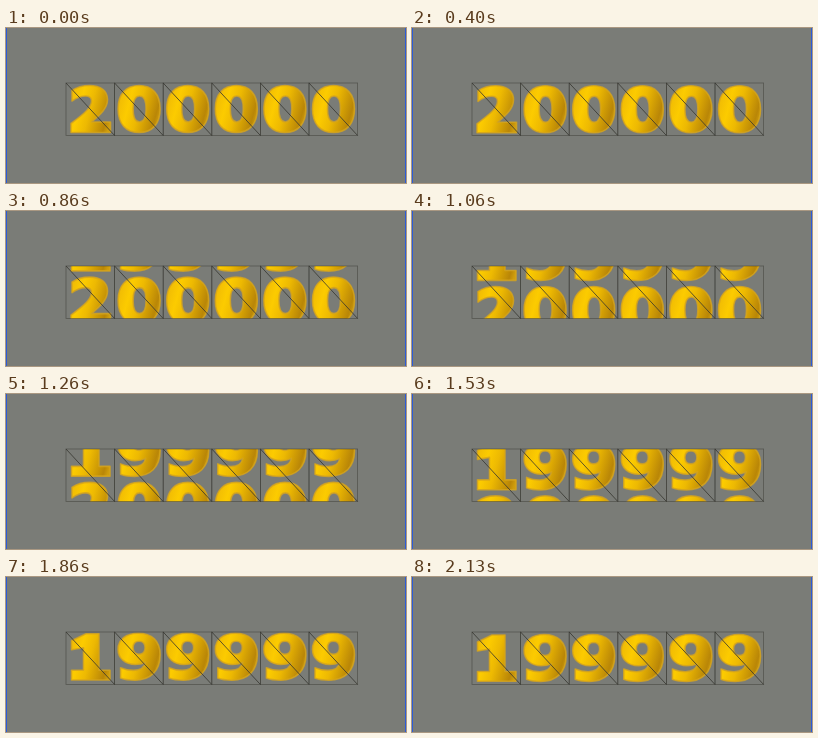
An HTML page for the animation above (2720 ms loop, 400 by 155 pixels).

```html
<!DOCTYPE html>
<html lang="en">
<head>
<meta charset="utf-8">
<title>Rolling counter</title>
<style>
  html, body { margin: 0; width: 100%; height: 100%; overflow: hidden; background: #7a7c77; }
  svg { display: block; width: 400px; height: 155px; }
  .digit { fill: url(#gold); fill-rule: evenodd; stroke: #d8a51c; stroke-opacity: .8; stroke-width: 1.6; stroke-linejoin: round; }
  .cell { fill: none; stroke: #30302b; stroke-opacity: .5; stroke-width: .8; }
  .slash { fill: none; stroke: #35352f; stroke-width: .8; }
</style>
</head>
<body>
<svg viewBox="0 0 400 155" role="img" aria-label="Counter rolling from 200000 to 199999">
  <defs>
    <linearGradient id="gold" gradientUnits="userSpaceOnUse" x1="3" y1="20" x2="46" y2="32">
      <stop offset="0" stop-color="#f0bb04"/>
      <stop offset=".25" stop-color="#fccb00"/>
      <stop offset=".5" stop-color="#edb902"/>
      <stop offset=".9" stop-color="#b98607"/>
      <stop offset="1" stop-color="#cf9d0c"/>
    </linearGradient>
    <clipPath id="window"><rect x="60" y="55" width="291.5" height="52.5"/></clipPath>
    <path id="d0" class="digit" d="M24.500 2.500C37.500 2.500 45.500 11 45.500 26S37.500 49.500 24.500 49.500S3.500 41 3.500 26S11.500 2.500 24.500 2.500ZM25 13C20.800 13 18.500 17 18.500 26S20.800 39 25 39S31.500 35 31.500 26S29.200 13 25 13Z"/>
    <path id="d1" class="digit" d="M20 3H33V39.500H44V49.300H5.500V39.500H17.500V17L5.500 19V10Z"/>
    <path id="d2" class="digit" d="M6 7.500C11 4 17 2.500 23.500 2.500C35 2.500 41.500 8 41.500 16.500C41.500 25 35 31 25.500 39H44.500V49.500H5V40.500C19 30 25.500 24.500 25.500 18C25.500 14.500 23 13 19.500 13C15 13 10.500 14.800 6 18Z"/>
    <path id="d9" class="digit" d="M23.500 2.500C37.500 2.500 45.500 10.500 45.500 24C45.500 40.500 35.500 49.500 20 49.500C14.500 49.500 9.500 48.700 6 47.300V37C10.500 39 15 39.700 19 39.700C26 39.700 30 37 31 31.500C28 33 24.500 33.800 20.500 33.800C10.500 33.800 3.500 27.500 3.500 18.500C3.500 9 11.500 2.500 23.500 2.500ZM24.500 10.500C20.500 10.500 18.500 13 18.500 17S20.500 23.500 24.500 23.500S30.500 21 30.500 17S28.500 10.500 24.500 10.500Z"/>
  </defs>
  <rect width="400" height="155" fill="#7a7c77"/>
  <rect width="1" height="155" fill="#2c5bd8"/>
  <rect x="399" width="1" height="155" fill="#2c5bd8"/>
  <g clip-path="url(#window)"><g id="reel"></g></g>
  <g id="grid"></g>
</svg>
<script>
const LOOP = 2720, FRAME = 1000 / 15, STEPS = 28, FIRST = 4;
const LEFT = 60, TOP = 55, CELL = 48.6, HEIGHT = 52.5, PITCH = 53;
const reel = document.getElementById('reel');
const grid = document.getElementById('grid');

function add(parent, tag, attributes) {
  const node = document.createElementNS('http://www.w3.org/2000/svg', tag);
  for (const name in attributes) node.setAttribute(name, attributes[name]);
  parent.append(node);
}

// Two rows: the next number sits one pitch above the current one.
function addRow(text, y) {
  [...text].forEach((digit, i) => {
    add(reel, 'use', { href: '#d' + digit, transform: `translate(${LEFT + i * CELL} ${y})` });
  });
}
addRow('200000', TOP);
addRow('199999', TOP - PITCH);

// Translucent borders darken where neighbouring cells meet.
for (let i = 0; i < 6; i++) {
  const x = LEFT + i * CELL;
  add(grid, 'rect', { class: 'cell', x, y: TOP, width: CELL, height: HEIGHT });
  add(grid, 'path', { class: 'slash', d: `M${x} ${TOP}l${CELL} ${HEIGHT}` });
}

// Symmetric cubic bezier (a, 0, 1 - a, 1), solved by bisection.
function ease(p, a = 0.57) {
  let lo = 0, hi = 1;
  for (let i = 0; i < 24; i++) {
    const s = (lo + hi) / 2, r = 1 - s;
    const x = 3 * r * r * s * a + 3 * r * s * s * (1 - a) + s * s * s;
    if (x < p) lo = s; else hi = s;
  }
  return lo * lo * (3 - 2 * lo);
}

function draw(now) {
  // Small lead because frame times are cut to 10 ms.
  const step = Math.floor((now % LOOP + 7) / FRAME) - FIRST;
  const p = Math.min(1, Math.max(0, step / STEPS));
  const shift = p === 0 || p === 1 ? p : ease(p);
  reel.setAttribute('transform', `translate(0 ${(shift * PITCH).toFixed(2)})`);
}

const start = performance.now();
function tick() {
  draw(performance.now() - start);
  requestAnimationFrame(tick);
}
tick();
</script>
</body>
</html>
```
